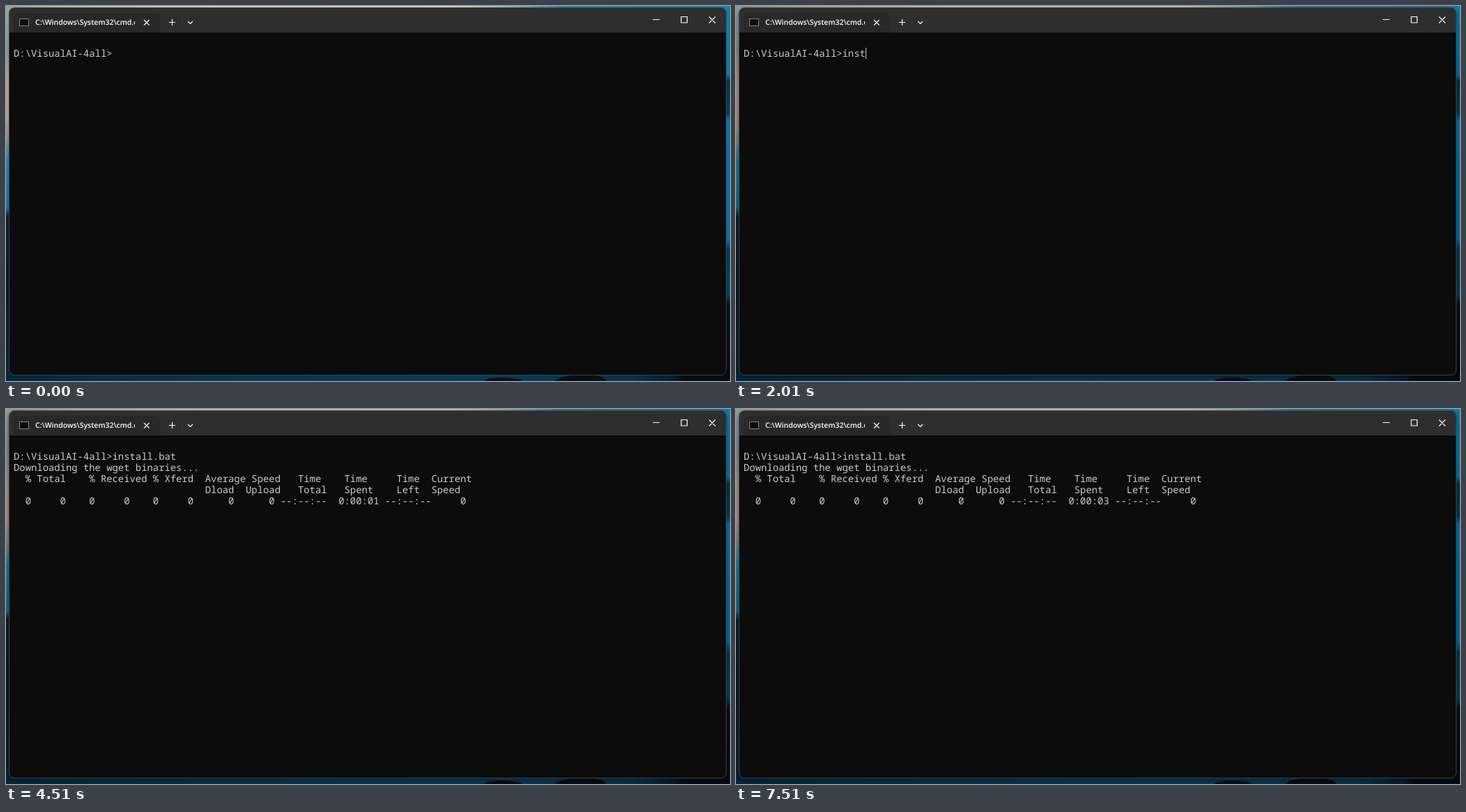
Animation of 1039x539 px, one loop 8 s. Source, as an HTML page:

```html
<!DOCTYPE html>
<html lang="en">
<head>
<meta charset="utf-8">
<title>Terminal</title>
<style>
html, body { margin: 0; width: 100%; height: 100%; overflow: hidden; }
body { position: relative; background: #06243c; }
body > *, #win { position: absolute; }
.wall { top: 0; height: 539px; }
#top { left: 0; width: 1039px; height: 4px;
  background: linear-gradient(90deg, #8fa3a8, #b9b9a6 90px, #d3cdb0 300px, #d8d0b0 640px, #7fb0b4 730px, #1786b0 800px, #0c7fae); }
#left { left: 0; width: 8px;
  background: linear-gradient(#93a4aa, #84939b 60px, #b39c8a 115px, #b2988a 160px, #7f8d95 190px, #1b83ae 225px, #12729f 290px, #06223a 302px, #031a30 400px, #04263f); }
#right { left: 1030px; width: 9px;
  background: linear-gradient(#0c7fae, #0b7aa8 98px, #07324c 108px, #08405f 155px, #0876ae 165px, #0870a6 335px, #063a5a 350px, #07415f 415px, #03121f 430px, #020d18); }
#base { left: 0; top: 528px; width: 1039px; height: 11px;
  background: linear-gradient(90deg, #04263f, #073453 300px, #083a5c 680px, #07324f 900px, #041c30 960px, #020d18 975px); }
#win { left: 4px; top: 2px; width: 1030px; height: 529px; box-sizing: border-box;
  border: 1px solid #3d3f40; border-radius: 8px; overflow: hidden;
  background: linear-gradient(#2e2e2e 35px, #0c0c0c 35px); }
#win.active { border-color: #45413c; box-shadow: 0 2px 10px rgba(0, 0, 0, .5); }
#name { left: 42px; top: 16px; width: 143px; height: 16px; overflow: hidden; white-space: nowrap;
  font: 600 10.5px/16px "Open Sans", "Noto Sans", sans-serif; color: #fff; text-rendering: geometricPrecision; }
#text { left: 11px; top: 61px; margin: 0; color: #ccc;
  font: 500 13.889px/16px "Noto Sans Mono", monospace; font-variant-ligatures: none; text-rendering: geometricPrecision; }
#caret { width: 1px; height: 16px; background: #ccc; }
svg { left: 0; top: 0; }
</style>
</head>
<body>
<div class="wall" id="left"></div>
<div class="wall" id="right"></div>
<div id="top"></div>
<div id="base"></div>
<svg width="1039" height="539" fill="#020e1a">
  <path d="M686 539Q692 534 712 534T742 539ZM788 539Q796 531 826 530T862 539Z"/>
</svg>
<div id="win"></div>
<svg width="1039" height="539" fill="none" stroke="#fff" stroke-width="1.2">
  <path d="M7 37.5Q11 37 11 33V17Q11 10 18 10H214Q221 10 221 17V33Q221 37 225 37.5Z" fill="#282828" stroke="none"/>
  <path d="M252.5 15V32" stroke="#363636"/>
  <rect x="19.5" y="18.5" width="13" height="10" fill="#0b0b10" stroke="#858585" stroke-width="1"/>
  <path d="M198 20L205.5 27.5M205.5 20L198 27.5M234 23.5H243M238.5 19V28M261 22L264.5 25.5L268 22"/>
  <path d="M928 19.5H938M969 15.5H977.5V24H969ZM1009 15.5L1018 24.5M1018 15.5L1009 24.5"/>
</svg>
<div id="name">C:\Windows\System32\cmd.exe</div>
<pre id="text"></pre>
<div id="caret"></div>
<svg width="1039" height="539">
  <path id="mouse" d="M340 289V300.5L342.6 298.2L344.4 302L346.2 301.2L344.5 297.5H348Z" fill="#fff" stroke="#000" stroke-width=".5"/>
  <circle id="click" cx="339.8" cy="289" r="10.5" fill="#ff0" fill-opacity=".5"/>
</svg>
<script>
const LOOP = 8000, CELL = 25 / 3, ROW = 16;
const PROMPT = 'D:\\VisualAI-4all>', COMMAND = 'install.bat';
const HEAD = [
  'Downloading the wget binaries...',
  '  % Total    % Received % Xferd  Average Speed   Time    Time     Time  Current',
  '                                 Dload  Upload   Total   Spent    Left  Speed',
  ''
].join('\n');

// last value whose start time has passed
const at = (t, steps) => steps.filter(([start]) => t >= start).pop()[1];
const typed = [[0, 0], [1490, 1], [2010, 4], [2510, 11]];
const spent = [[0, '--:--:--'], [4510, ' 0:00:01'], [5510, ' 0:00:02'], [6510, ' 0:00:03']];
// caret as [column, row], or null while blinked off
const caretAt = [
  [0, null], [500, [17, 0]], [1490, [18, 0]], [2010, [21, 0]], [2510, [28, 0]],
  [3010, [78, 4]], [4010, [0, 4]], [4510, null], [5010, [78, 4]],
  [6010, null], [7010, [0, 5]], [7510, null]
];

const el = id => document.getElementById(id);
const show = (id, on) => { el(id).style.visibility = on ? 'visible' : 'hidden'; };

function draw() {
  const t = performance.now() % LOOP;
  let text = PROMPT + COMMAND.slice(0, at(t, typed));
  if (t >= 3010) {
    text += '\n' + HEAD + '  0     0    0     0    0     0      0      0 --:--:-- '
      + at(t, spent) + ' --:--:--     0';
  }
  if (el('text').textContent !== text) el('text').textContent = text;

  const caret = at(t, caretAt);
  show('caret', caret);
  if (caret) {
    el('caret').style.left = 11 + Math.round(caret[0] * CELL) + 'px';
    el('caret').style.top = 60 + caret[1] * ROW + 'px';
  }
  el('win').className = t >= 500 ? 'active' : '';
  show('mouse', t >= 500 && t < 1490);
  show('click', t >= 500 && t < 990);
  requestAnimationFrame(draw);
}
draw();
</script>
</body>
</html>
```
